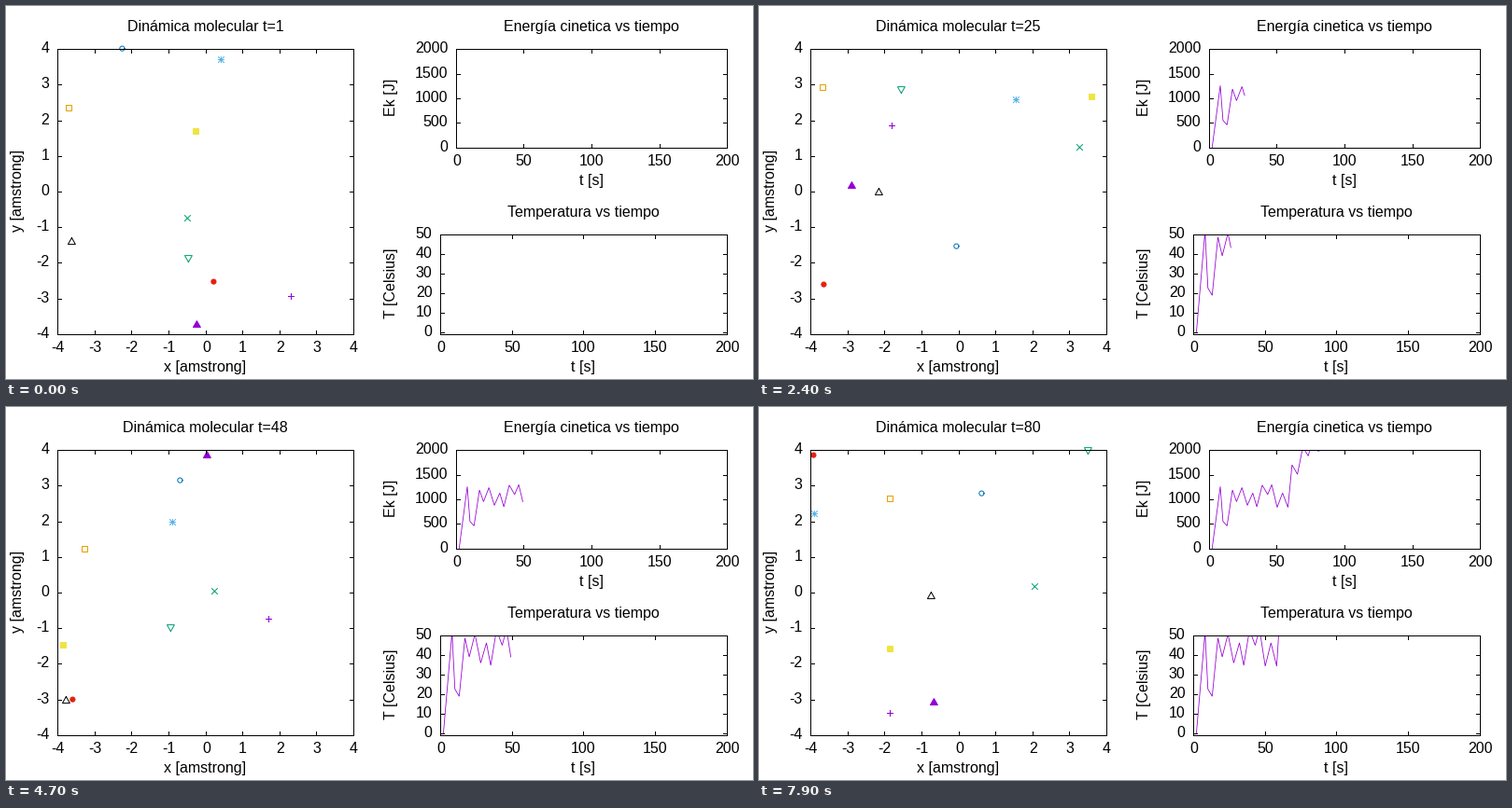
These frames come from a looping animation (800x400 px, 8 s). A matplotlib script:

```python
import matplotlib.pyplot as plt
import numpy as np
from matplotlib.animation import FuncAnimation
from matplotlib.patches import Rectangle

W, H, DPI = 800, 400, 100
PX = 72 / DPI  # points per pixel
STEPS, INTERVAL = 80, 100

PURPLE, GREEN, SKY, ORANGE, YELLOW = "#9400d3", "#009e73", "#56b4e9", "#e69f00", "#f0e442"
BLUE, RED, BLACK = "#0072b2", "#e51e10", "#000000"

plt.rcParams["font.family"] = "Liberation Sans"
plt.rcParams["font.size"] = 16 * PX

fig = plt.figure(figsize=(W / DPI, H / DPI), dpi=DPI, facecolor="white")
ax = fig.add_axes([0, 0, 1, 1])
# Whole numbers fall just short of pixel centres, so snapping keeps them in place
ax.set_xlim(-0.4, W - 0.4)
ax.set_ylim(H - 0.6, -0.6)
ax.axis("off")


def label(x, y, text, ha="center", rotation=0):
    return ax.text(x, y, text, ha=ha, va="baseline", rotation=rotation,
                   rotation_mode="anchor", color=BLACK)


def stroke(xs, ys, color=BLACK, width=1.0, zorder=2):
    return ax.plot(xs, ys, color=color, lw=width * PX, zorder=zorder,
                   solid_capstyle="projecting", solid_joinstyle="miter")[0]


class Panel:
    """A boxed plot with inward ticks mirrored on all sides."""

    def __init__(self, box, xlim, ylim, xticks, yticks, title, xlabel, ylabel, ylabel_x):
        self.box, self.xlim, self.ylim = box, xlim, ylim
        x0, y0, x1, y1 = box
        mid = (x0 + x1) / 2 - 0.5
        stroke([x0, x1, x1, x0, x0], [y0, y0, y1, y1, y0], zorder=5)
        for v in xticks:
            x = round(float(self.px(v)))
            stroke([x, x], [y1, y1 - 4], zorder=5)
            stroke([x, x], [y0, y0 + 4], zorder=5)
            label(x, y1 + 19.5, str(v))
        for v in yticks:
            y = round(float(self.py(v)))
            stroke([x0, x0 + 4], [y, y], zorder=5)
            stroke([x1, x1 - 4], [y, y], zorder=5)
            label(x0 - 9, y + 4, str(v), ha="right")
        self.title = label(mid, y0 - 18.5, title)
        label(mid, y1 + 40.5, xlabel)
        label(ylabel_x, (y0 + y1) / 2 - 1, ylabel, rotation=90)

    def px(self, v):
        x0, _, x1, _ = self.box
        a, b = self.xlim
        return x0 + (np.asarray(v) - a) / (b - a) * (x1 - x0)

    def py(self, v):
        _, y0, _, y1 = self.box
        a, b = self.ylim
        return y1 - (np.asarray(v) - a) / (b - a) * (y1 - y0)

    def curve(self):
        x0, y0, x1, y1 = self.box
        line = stroke([], [], PURPLE, width=0.8)
        line.set_clip_path(Rectangle((x0, y0), x1 - x0, y1 - y0, transform=ax.transData))
        return line


space = Panel((55, 45, 372, 351), (-4, 4), (-4, 4), range(-4, 5), range(-4, 5),
              "Dinámica molecular t=1", "x [amstrong]", "y [amstrong]", 17)
kinetic = Panel((482, 45, 772, 151), (0, 200), (0, 2000), range(0, 201, 50),
                range(0, 2001, 500), "Energía cinetica vs tiempo", "t [s]", "Ek [J]", 417)
heat = Panel((465, 244, 772, 351), (0, 200), (-1, 50), range(0, 201, 50),
             range(0, 51, 10), "Temperatura vs tiempo", "t [s]", "T [Celsius]", 417)

# Energy spikes once, then swings between evenly timed troughs and peaks
SPIKE = [(2, 0), (8, 1250), (10, 545)]
SWINGS = [455, 1180, 945, 1230, 870, 1120, 840, 1280, 1090, 1290, 830, 1120, 830,
          1690, 1500, 2050, 1870, 2200, 1970]
DEGREES_PER_JOULE = 0.0411

time = np.arange(2, STEPS + 2)
spike_t, spike_e = zip(*SPIKE)
swing_t = np.round(np.linspace(13, STEPS, len(SWINGS)))
energy = np.interp(time, [*spike_t, *swing_t], [*spike_e, *SWINGS])

ek_line, temp_line = kinetic.curve(), heat.curve()

# Marker outlines in pixels around the centre
GAP = [(np.nan, np.nan)]
PLUS = [(-3, 0), (3, 0)] + GAP + [(0, -3), (0, 3)]
CROSS = [(-3, -3), (3, 3)] + GAP + [(-3, 3), (3, -3)]
SQUARE = [(-3, -3), (3, -3), (3, 3), (-3, 3), (-3, -3)]
TRIANGLE = [(0, -4), (4, 3), (-4, 3), (0, -4)]
DOWN = [(x, -y) for x, y in TRIANGLE]
RING = [(2.6 * np.cos(a), 2.6 * np.sin(a)) for a in np.linspace(0, 2 * np.pi, 17)]

# Each particle: shape, filled, colour, then where it is at the key times
KEYS = [1, 39, 80]
PARTICLES = [
    (PLUS, False, PURPLE, (305, 310), (232, 198), (140, 327)),
    (CROSS, False, GREEN, (194, 227), (113, 285), (295, 192)),
    (PLUS + GAP + CROSS, False, SKY, (230, 57), (301, 125), (59, 114)),
    (SQUARE, False, ORANGE, (67, 108), (68, 252), (140, 97)),
    (SQUARE, True, YELLOW, (203, 133), (128, 253), (140, 258)),
    (RING, False, BLUE, (124, 45), (261, 74), (238, 92)),
    (RING, True, RED, (222, 295), (164, 300), (58, 51)),
    (TRIANGLE, False, BLACK, (70, 252), (347, 346), (184, 202)),
    (TRIANGLE, True, PURPLE, (204, 341), (223, 283), (187, 316)),
    (DOWN, False, GREEN, (195, 270), (127, 289), (352, 46)),
]
CORNER, PERIOD = np.array([55, 45]), np.array([317, 306])
rng = np.random.default_rng(4)


class Particle:
    """Flies straight between key points, leaving one wall and entering by the other."""

    def __init__(self, shape, filled, color, *points):
        self.shape, self.filled = np.array(shape, float), filled
        laps = rng.integers(-1, 2, (len(points) - 1, 2))
        hops = np.diff(points, axis=0) + laps * PERIOD
        self.path = np.vstack([points[0], points[0] + np.cumsum(hops, axis=0)])
        if filled:
            self.art = ax.fill(*self.shape.T, fc=color, ec=color, lw=PX, zorder=3)[0]
        else:
            self.art = stroke([], [], color, zorder=3)

    def draw(self, t):
        pos = np.array([np.interp(t, KEYS, axis) for axis in self.path.T])
        xy = self.shape + CORNER + np.round(pos - CORNER) % PERIOD
        if self.filled:
            self.art.set_xy(xy)
        else:
            self.art.set_data(xy[:, 0], xy[:, 1])


particles = [Particle(*spec) for spec in PARTICLES]


def update(frame):
    t = frame + 1
    space.title.set_text(f"Dinámica molecular t={t}")
    for p in particles:
        p.draw(t)
    ek_line.set_data(kinetic.px(time[:t]), kinetic.py(energy[:t]))
    temp_line.set_data(heat.px(time[:t]), heat.py(energy[:t] * DEGREES_PER_JOULE))
    return []


anim = FuncAnimation(fig, update, frames=STEPS, interval=INTERVAL, repeat=True,
                     repeat_delay=0, blit=False)
plt.show()
```
